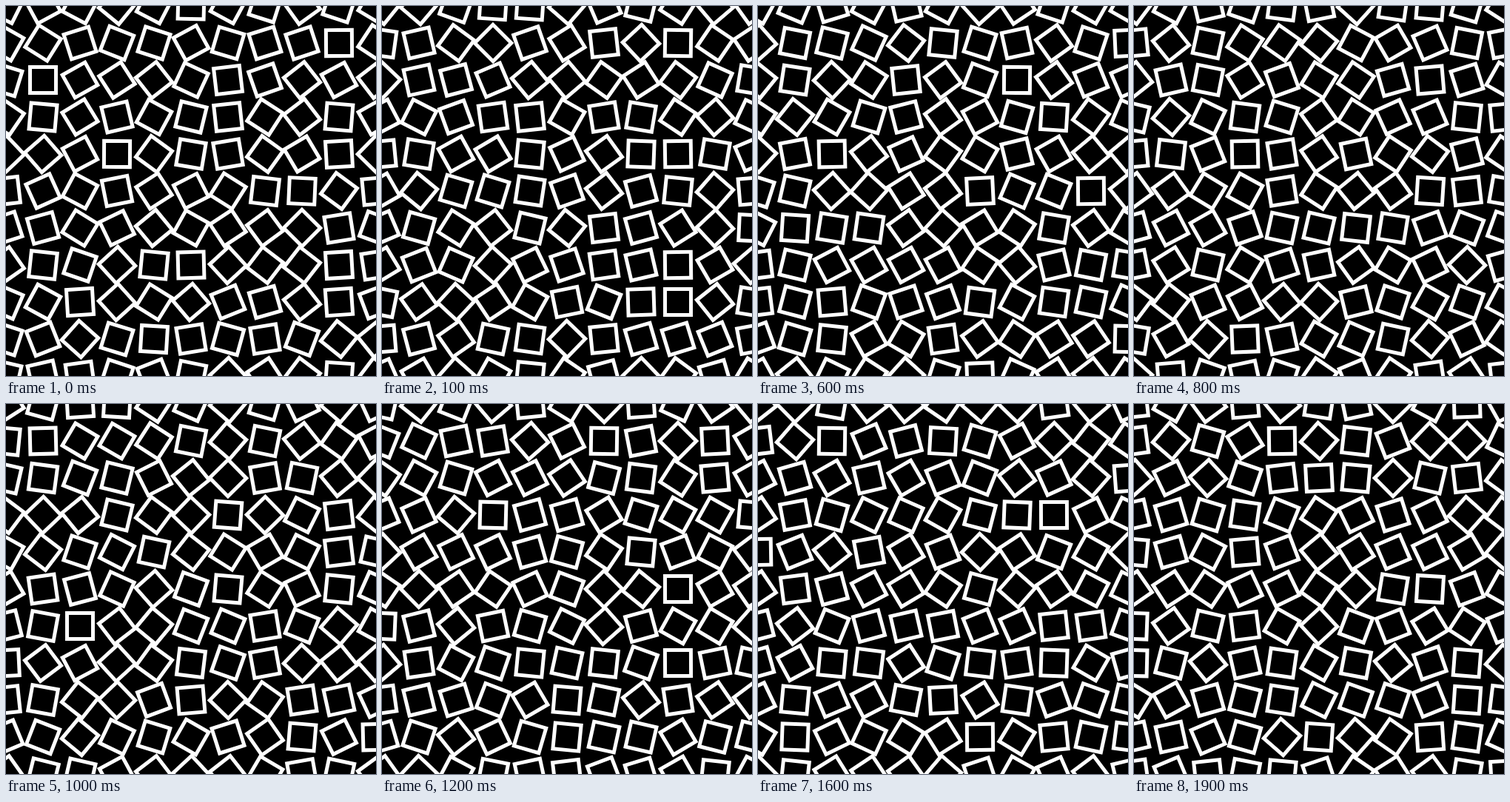
Animation of 500 by 500 pixels, one loop 2 s. Source, as an HTML page with a canvas:

```html
<!DOCTYPE html>
<html lang="en">
<head>
<meta charset="utf-8">
<title>Restless squares</title>
<style>
  html, body { margin: 0; width: 100%; height: 100%; overflow: hidden; background: #000; }
  canvas { display: block; width: 500px; height: 500px; }
</style>
</head>
<body>
<canvas width="500" height="500"></canvas>
<script>
const ctx = document.querySelector('canvas').getContext('2d');
const STAGE = 500, GAP = 50, SIDE = 35, LINE = 5;
const STEP_MS = 100, STEPS = 20;

// Small seeded generator giving values in [0, 1)
function seeded(seed) {
  let state = seed;
  return () => {
    state = (state + 0x6D2B79F5) | 0;
    let t = Math.imul(state ^ (state >>> 15), state | 1);
    t ^= t + Math.imul(t ^ (t >>> 7), t | 61);
    return ((t ^ (t >>> 14)) >>> 0) / 4294967296;
  };
}

function drawSquare(x, y, angle) {
  ctx.save();
  ctx.translate(x, y);
  ctx.rotate(angle);
  ctx.strokeRect(-SIDE / 2, -SIDE / 2, SIDE, SIDE);
  ctx.restore();
}

function drawStep(step) {
  const random = seeded(1000 + step * 7919);
  ctx.fillStyle = '#000';
  ctx.fillRect(0, 0, STAGE, STAGE);
  ctx.strokeStyle = '#fff';
  ctx.lineWidth = LINE;
  for (let x = 0; x <= STAGE; x += GAP) {
    for (let y = 0; y <= STAGE; y += GAP) {
      drawSquare(x, y, (random() - 0.5) * Math.PI / 2);
    }
  }
}

let shown = -1;
function tick() {
  const step = Math.floor(performance.now() / STEP_MS) % STEPS;
  if (step !== shown) drawStep(shown = step);
  requestAnimationFrame(tick);
}
tick();
</script>
</body>
</html>
```
